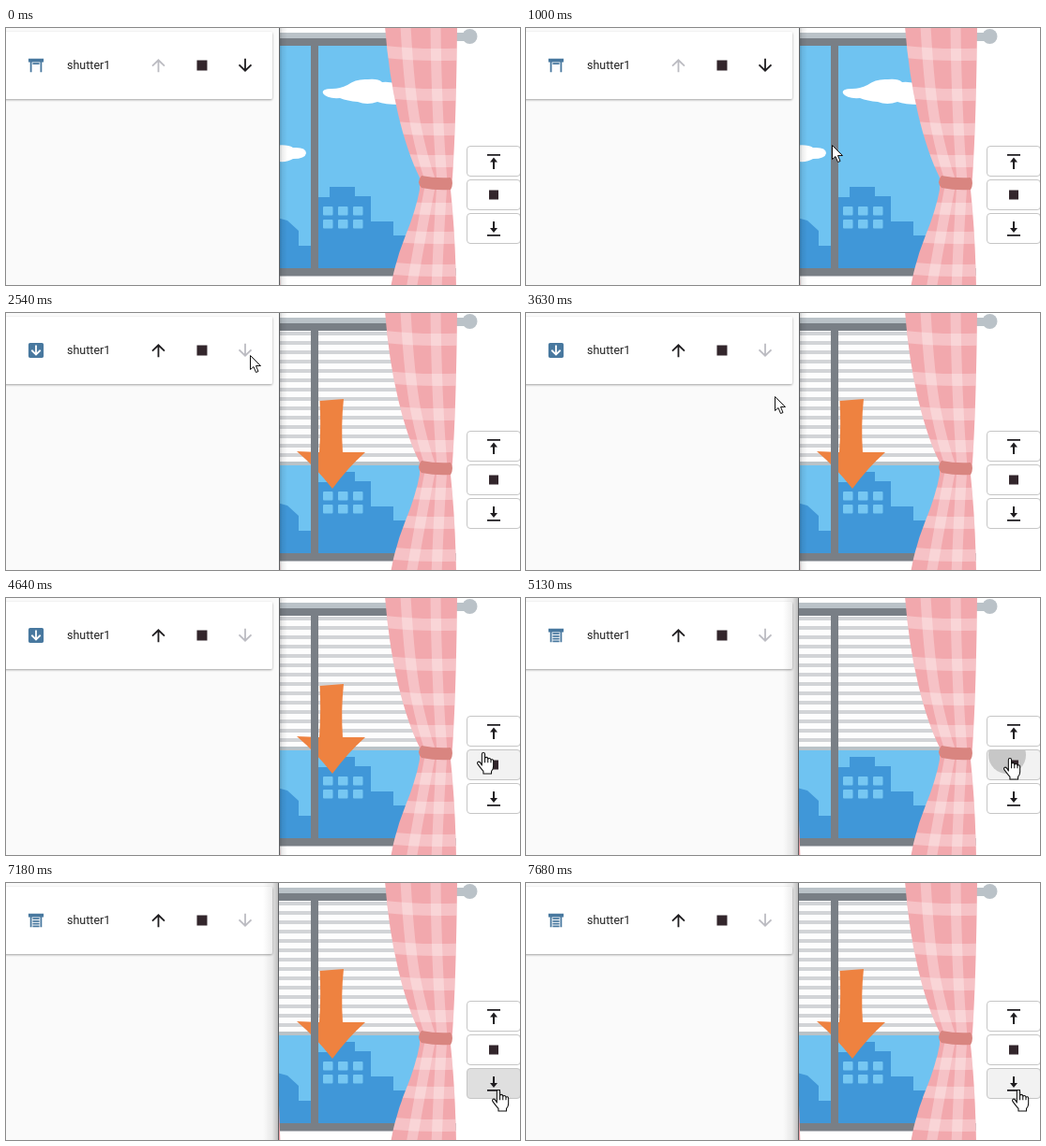
Recreate the animation shown at these times as an HTML page. Size 548 px wide and 275 px high, loop 8000 ms.

```html
<!DOCTYPE html>
<html lang="en">
<head>
<meta charset="utf-8">
<title>Shutter control</title>
<style>
  html, body { margin: 0; width: 100%; height: 100%; overflow: hidden; background: #fff; }
  svg { display: block; }
  .btn { fill: #fff; stroke: #c6c6c6; }
  .hover { fill: #f2f2f2; }
  .ink { fill: #1f1d20; }
  .off { fill: #bcbcc2; }
  .blue { fill: #48789f; }
  .stop { fill: #33262c; }
  .pointer { fill: #fff; stroke: #111; stroke-linejoin: round; }
  text { font: 12.5px Roboto, Arial, sans-serif; fill: #212121; }
</style>
</head>
<body>
<svg width="548" height="275" viewBox="0 0 548 275">
  <defs>
    <filter id="rough" filterUnits="userSpaceOnUse" x="280" y="-10" width="268" height="300" color-interpolation-filters="sRGB">
      <feTurbulence type="fractalNoise" baseFrequency=".2" numOctaves="2" seed="4"/>
      <feDisplacementMap in="SourceGraphic" scale="1.2" xChannelSelector="R" yChannelSelector="G"/>
      <feGaussianBlur stdDeviation=".4"/>
    </filter>
    <filter id="soft" x="-5%" y="-10%" width="110%" height="130%">
      <feDropShadow dx="0" dy="1" stdDeviation="1.2" flood-opacity=".36"/>
    </filter>
    <linearGradient id="edge">
      <stop offset="0" stop-opacity="0"/>
      <stop offset=".6" stop-opacity=".07"/>
      <stop offset="1" stop-opacity=".24"/>
    </linearGradient>
    <pattern id="slats" width="300" height="10" y="20" patternUnits="userSpaceOnUse">
      <rect width="300" height="10" fill="#fdfdfd"/>
      <rect width="300" height="4" fill="#d2d4d7"/>
    </pattern>
    <clipPath id="drape">
      <path d="M404-2Q408 50 418 92T441 160V173Q437 195 426 222T410 278H480Q479 220 474 173L476 160Q480 100 481-2Z"/>
    </clipPath>
    <clipPath id="stopClip"><rect x="492" y="163" width="56" height="31" rx="3"/></clipPath>
    <clipPath id="downClip"><rect x="492" y="199" width="56" height="31" rx="3"/></clipPath>
  </defs>

  <!-- window -->
  <g filter="url(#rough)">
    <path fill="#bac2c8" d="M285 5H490V14H285Z"/>
    <path fill="#bac2c8" d="M470 257H480V265H470Z"/>
    <circle cx="494.500" cy="9" r="8" fill="#bac2c8"/>
    <path fill="#6fc3f1" d="M285 18H445V260H285Z"/>
    <g fill="#fff">
      <path d="M338 70Q336 65 348 65 356 65 364 61 373 54 386 55 397 54 401 58 410 57 420 61V82Q404 82 396 79 385 83 375 79 364 78 356 75 342 76 338 70Z"/>
      <path d="M285 126Q300 124 306 128 320 127 320 134 319 140 306 140 298 145 285 142Z"/>
    </g>
    <path fill="#4097d8" d="M285 202 300 206 312 217V233H327V258H333V181H345V170H372V180H389V207H413V222H440V258H285Z"/>
    <g id="panes" fill="#76c7f2"></g>
    <g id="shutter">
      <path fill="url(#slats)" d="M285 18H445V160H285Z"/>
      <path fill="#b9c2c7" d="M285 159H445V163H285Z"/>
    </g>
    <path id="arrow" fill="#ee8240" d="M334.500 94 360 92Q357 120 359 149L383 149Q364 166 348 188 330 165 310 148L334 149Q336 120 334.500 94Z"/>
    <path fill="#797f86" d="M285 11H445V19H333V257H445V265.500H285V257H325V19H285Z"/>
    <path fill="#eea0a6" d="M285 212H290Q291 235 292.500 280H285Z"/>
    <g clip-path="url(#drape)">
      <path fill="#f2a8ad" d="M400-5H485V280H400Z"/>
      <g fill="none" stroke="#fff" stroke-opacity=".3">
        <path stroke-width="11" d="M426-2Q430 70 437 105T453 165Q446 200 432 280M458-2Q459 90 465 165 462 205 459 280"/>
        <path id="bands" stroke-width="13"/>
      </g>
    </g>
    <path fill="#d98580" d="M443 158Q458 161 474 160 478 166 474 173 458 174 443 171 437 165 443 158Z"/>
  </g>

  <!-- control panel; the focused side casts a shadow on the other -->
  <rect id="panel" x="-10" width="301" height="275" fill="#fafafa"/>
  <rect x="-3" y="4" width="287" height="72" rx="2" fill="#fff" filter="url(#soft)"/>
  <rect id="leftShade" x="274" width="16" height="275" fill="url(#edge)"/>
  <rect id="rightShade" x="-300" width="9" height="275" fill="url(#edge)" transform="scale(-1 1)"/>
  <rect id="divider" x="291" width="1" height="275" fill="#5d5f62"/>
  <path id="state" class="blue" transform="translate(21.200 29.200) scale(.9)"/>
  <text x="65" y="44">shutter1</text>
  <path id="up" transform="translate(151.700 29.200) scale(.9)" d="M13 20H11V8L5.500 13.500 4.080 12.080 12 4.160 19.920 12.080 18.500 13.500 13 8Z"/>
  <path class="stop" d="M203.500 34.500H214.500V45.500H203.500Z"/>
  <path id="down" transform="translate(244.200 50.800) scale(.9 -.9)" d="M13 20H11V8L5.500 13.500 4.080 12.080 12 4.160 19.920 12.080 18.500 13.500 13 8Z"/>

  <!-- buttons -->
  <rect class="btn" x="491.500" y="126.500" width="57" height="32" rx="3.500"/>
  <rect class="btn" id="stopBtn" x="491.500" y="162.500" width="57" height="32" rx="3.500"/>
  <rect class="btn" id="downBtn" x="491.500" y="198.500" width="57" height="32" rx="3.500"/>
  <g clip-path="url(#stopClip)"><circle id="stopRipple" cx="513" cy="168" r="20" opacity=".18"/></g>
  <g clip-path="url(#downClip)"><circle id="downRipple" cx="523" cy="222" r="40" opacity=".08"/></g>
  <path class="ink" d="M513 135H527V136.700H513ZM520 138.500 524 143.500H521V151H519V143.500H516Z"/>
  <path class="stop" d="M515 173.500H525V183.500H515Z"/>
  <path class="ink" d="M513 221H527V222.700H513ZM520 219 524 214H521V207H519V214H516Z"/>

  <!-- pointer -->
  <circle id="glow" cx="260" cy="45" r="12" fill="#fff04a" style="mix-blend-mode:multiply"/>
  <path id="cursor" class="pointer" d="M.5.5V15.500L4 12.500 6.500 18.500 9 17.500 6.500 11.500H11.500Z"/>
  <g id="hand" class="pointer">
    <path transform="scale(1.070)" d="M5 13V2Q5 .5 6.500 .5T8 2V6.500Q8 5 9.500 5T11 7Q11.500 6 12.700 6T14 8Q14.500 7 15.500 7.200T16.500 9V14Q16.500 17 14.500 19V21.500H6.500V19Q3 15 .8 11.800 0 10 1.500 9.500T5 13ZM8 6.500V10.500M11 7V10.500M14 8V10.500"/>
  </g>
</svg>
<script>
const $ = id => document.getElementById(id);
const show = (id, on) => $(id).style.display = on ? '' : 'none';

const frame = 'M3 4H21V8H19V20H17V8H7V20H5V8H3Z';
const slat = y => `M8 ${y}H16V${y + 2}H8Z`;
const icons = {
  open: frame + slat(9),
  moving: 'M5 3H19A2 2 0 0 1 21 5V19A2 2 0 0 1 19 21H5A2 2 0 0 1 3 19V5A2 2 0 0 1 5 3M11 6V14.500L7.500 11 6.080 12.420 12 18.340 17.920 12.420 16.500 11 13 14.500V6Z',
  closed: frame + [9, 12, 15, 18].map(slat).join('')
};

// start time, x, y, pointer shape
const moves = [
  [1000, 326, 125, 'cursor'], [1520, 263, 48, 'cursor'], [2030, 260, 45, 'cursor'],
  [3630, 265, 89, 'cursor'], [4130, 466, 147, 'cursor'], [4640, 502, 165, 'hand'],
  [5130, 509, 171, 'hand'], [5640, 515, 199, 'hand'], [6140, 516, 207, 'hand'],
  [6680, 518, 221, 'hand']
];

$('panes').innerHTML = [191, 205].map(y => [338, 354, 370].map(x =>
  `<rect x="${x}" y="${y}" width="10.500" height="9.500" rx="1"/>`).join('')).join('');
$('bands').setAttribute('d', [28, 71, 108, 142, 193, 224, 259].map(y =>
  `M400 ${y - 3}Q440 ${y + 2} 485 ${y}`).join(''));

function draw(now) {
  const t = now % 8000;
  const within = (a, b = 8000) => t >= a && t < b;
  const lowered = within(2540);
  const rightFocused = within(5130);

  show('shutter', lowered);
  show('arrow', within(2540, 5130) || within(7180));
  $('state').setAttribute('d', icons[t < 2540 ? 'open' : t < 5130 ? 'moving' : 'closed']);
  $('up').setAttribute('class', lowered ? 'ink' : 'off');
  $('down').setAttribute('class', lowered ? 'off' : 'ink');

  show('leftShade', rightFocused);
  show('rightShade', !rightFocused);
  for (const id of ['panel', 'divider'])
    $(id).setAttribute('transform', `translate(${rightFocused ? -1 : 0})`);

  $('stopBtn').classList.toggle('hover', within(4640, 6140));
  $('downBtn').classList.toggle('hover', within(6680));
  show('stopRipple', within(5130, 5640));
  show('downRipple', within(7180, 7680));
  show('glow', within(2030, 2540));

  const move = moves.findLast(m => t >= m[0]);
  for (const id of ['cursor', 'hand']) show(id, move && move[3] === id);
  if (move) $(move[3]).setAttribute('transform', `translate(${move[1]} ${move[2]})`);
}

const start = performance.now();
function tick() {
  draw(performance.now() - start);
  requestAnimationFrame(tick);
}
tick();
</script>
</body>
</html>
```
